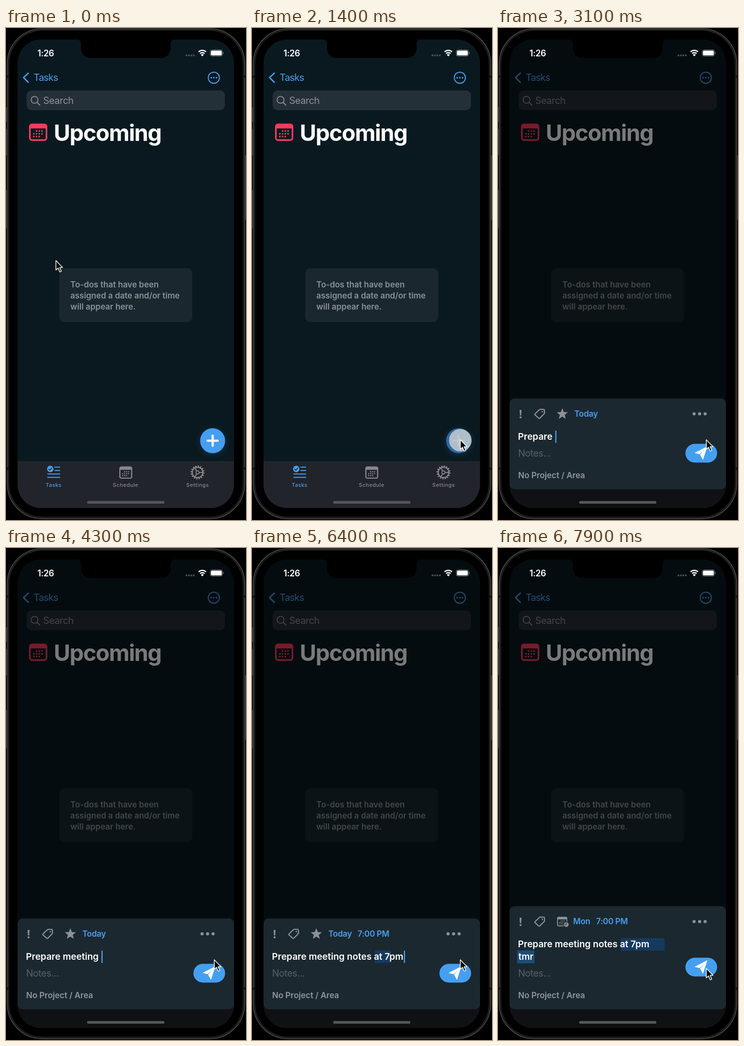
An HTML page that plays this animation: 500 by 1024 pixels, repeating every 8000 ms.

```html
<!DOCTYPE html>
<html lang="en">
<head>
<meta charset="utf-8">
<title>Quick task entry</title>
<style>
  html, body { margin: 0; width: 100%; height: 100%; overflow: hidden; background: #000; }
  svg { display: block; width: 500px; height: 1024px; font-family: Inter, Roboto, sans-serif; }
  text { white-space: pre; }
  .blue { color: #4a9fed; fill: #4a9fed; }
  .line { fill: none; stroke: currentColor; stroke-linecap: round; stroke-linejoin: round; }
  .grey { color: #85878b; fill: #85878b; }
  .label { font-size: 11px; font-weight: 500; letter-spacing: .5px; text-anchor: middle; }
  .nav { font-size: 20px; letter-spacing: -.8px; }
  .card { font-size: 17px; font-weight: 600; fill: #8b9397; }
  .chip { font-size: 17px; font-weight: 600; letter-spacing: -.3px; }
  .entry { font-size: 19px; font-weight: 600; fill: #fff; }
  .hint { font-size: 19.5px; fill: #566169; letter-spacing: -.4px; }
</style>
</head>
<body>
<svg viewBox="0 0 500 1024">
  <defs>
    <symbol id="calendar" viewBox="0 0 38 36" overflow="visible">
      <rect x="1.7" y="1.7" width="34.6" height="32.6" rx="4.5" class="line" stroke-width="3.4"/>
      <path d="M1 10V5a4 4 0 0 1 4-4h28a4 4 0 0 1 4 4v5z" fill="currentColor"/>
      <path d="M15.7 15.5h11.6M10 21.2h17.3M10 26.9h11.6" class="line" stroke-width="3.6" stroke-dasharray="0 5.7"/>
    </symbol>
    <clipPath id="screen"><rect x="24" y="24" width="451" height="975" rx="49"/></clipPath>
    <filter id="glow" x="-50%" y="-50%" width="200%" height="200%"><feGaussianBlur stdDeviation="6"/></filter>
  </defs>

  <!-- phone body -->
  <path d="M1 165v30M1 210v55M1 337v80M499 265v134" stroke="#2b2b2d" stroke-width="2"/>
  <rect x="2.5" y="1.5" width="495" height="1020" rx="73" fill="#1b1b1c" stroke="#4c4c4e" stroke-width="1.5"/>
  <rect x="6" y="5" width="488" height="1013" rx="70" stroke="#29292b"/>
  <path d="M2 101h4M2 917h4M494 101h4M494 917h4" stroke="#141415" stroke-width="5"/>

  <g clip-path="url(#screen)">
    <rect x="24" y="24" width="451" height="975" fill="#0a1920"/>

    <g class="blue">
      <path d="M46.5 94l-10 9.3 10 9.7" class="line" stroke-width="2.7"/>
      <text x="57.5" y="110" class="nav">Tasks</text>
      <circle cx="433" cy="103.5" r="11.6" class="line" stroke-width="2"/>
      <path d="M427.5 103.5h11.2" class="line" stroke-width="3.4" stroke-dasharray="0 5.5"/>
    </g>

    <rect x="43" y="130" width="413" height="41" rx="10" fill="#252f37"/>
    <g color="#8b9197" fill="#8b9197">
      <path d="M65 155l5.5 5.5" class="line" stroke-width="2"/>
      <circle cx="59.5" cy="149.5" r="7.2" class="line" stroke-width="1.8"/>
      <text x="77.5" y="158" class="nav" style="letter-spacing:-.55px">Search</text>
    </g>

    <use href="#calendar" x="48" y="199" width="38" height="36" color="#fd395b"/>
    <text x="99.5" y="234.5" fill="#fff" font-size="47" font-weight="700" letter-spacing="-1.4">Upcoming</text>

    <rect x="111" y="500" width="277" height="112" rx="11" fill="#1a272e"/>
    <g class="card">
      <text x="134" y="539.5">To-dos that have been</text>
      <text x="134" y="562.5">assigned a date and/or time</text>
      <text x="134" y="585.5">will appear here.</text>
    </g>

    <circle cx="430.5" cy="861" r="27" fill="#1e4c78" opacity=".45" filter="url(#glow)"/>
    <g id="add">
      <circle cx="430.5" cy="859" r="26" fill="#459ef0"/>
      <path d="M420 859h21M430.5 848.5v21" class="line" color="#fff" stroke-width="4.6"/>
    </g>

    <rect x="24" y="902" width="451" height="97" fill="#21242a"/>
    <path d="M24 902.5h451" stroke="#2c3035"/>
    <g class="blue">
      <circle cx="92.3" cy="917.8" r="6.7"/>
      <path d="M89.2 918l2.3 2.5 4-5" class="line" color="#21242a" stroke-width="1.8"/>
      <path d="M102 914h10M102 921h10M87 928.3h25M87 935.3h25" class="line" stroke-width="2.1"/>
      <text x="99.2" y="955" class="label">Tasks</text>
    </g>
    <g class="grey">
      <use href="#calendar" x="236" y="912.5" width="27" height="25.6"/>
      <text x="249.2" y="955" class="label">Schedule</text>
      <circle cx="399" cy="925" r="13.2" class="line" stroke-width="2.6" stroke-dasharray="2.6 2.58" style="stroke-linecap:butt"/>
      <circle cx="399" cy="925" r="11" class="line" stroke-width="2.3"/>
      <circle cx="399" cy="925" r="3.4" class="line" stroke-width="1.8"/>
      <path d="M402.5 925h7.5M397.2 922l-3.7-6.4M397.2 928l-3.7 6.4" class="line" stroke-width="2"/>
      <text x="399.2" y="955" class="label">Settings</text>
    </g>

    <rect id="dim" x="24" y="24" width="451" height="975" opacity=".52"/>
  </g>

  <!-- status bar -->
  <path d="M146 23.5c7 .5 10 3 10 9v8c0 14 8 22 22 22h143c14 0 22-8 22-22v-8c0-6 3-8.5 10-9z"/>
  <g fill="#fff" color="#fff">
    <text x="65.5" y="58.7" font-size="18" font-weight="600" letter-spacing="-.4">1:26</text>
    <path d="M376 57h16" class="line" color="#485057" stroke-width="4" stroke-dasharray="0 5.1"/>
    <path d="M401.2 49.7a11.2 11.2 0 0 1 15.6 0M404.2 53.2a6.9 6.9 0 0 1 9.6 0" class="line" stroke-width="2.5" style="stroke-linecap:butt"/>
    <path d="M409 59l-3.1-3.3a4.5 4.5 0 0 1 6.2 0z"/>
    <rect x="425.5" y="45.5" width="25.5" height="13" rx="4" fill="none" stroke="#8d9296"/>
    <rect x="427" y="47" width="22.5" height="10" rx="2.5"/>
    <path d="M452.3 50c1.6.7 1.6 3.3 0 4z" fill="#8d9296"/>
  </g>

  <g id="sheet">
    <rect id="panel" x="24" width="451" rx="11" fill="#1b2830"/>
    <g id="tools" color="#8d9095" fill="#8d9095">
      <path d="M45 795h4l-.7 11.5h-2.6z"/><circle cx="47" cy="810.3" r="2.1"/>
      <path d="M77.3 803l8.800-8.300q1-1 2.400-1l6.400.1q1.800.1 1.900 1.900l.1 5.200q0 1.400-1 2.400l-8.600 8.600q-1.400 1.300-2.800 0l-7.200-6.500q-1.300-1.200 0-2.400z" class="line" stroke-width="2.3"/>
      <circle cx="92.3" cy="798.5" r="1.5"/>
      <path id="star" d="M134 792.5l2.8 7.3 7.8.4-6.1 4.900 2.1 7.500-6.600-4.300-6.600 4.300 2.100-7.500-6.100-4.900 7.800-.4z" stroke="#8d9095" stroke-linejoin="round"/>
      <g id="dated">
        <use href="#calendar" x="123" y="793" width="21.5" height="20"/>
        <circle cx="142.3" cy="809.3" r="5.7" stroke="#1b2830" stroke-width="1.5"/>
        <path d="M142.3 806v3.5h-2.6" class="line" color="#1b2830" stroke-width="1.2"/>
      </g>
      <path d="M408.5 803h23.2" class="line" stroke-width="6.6" stroke-dasharray="0 11.5"/>
      <text id="day" y="808.8" class="chip blue"></text>
      <text id="hour" y="808.8" class="chip blue">7:00 PM</text>
    </g>
    <rect id="markTime" x="256" height="26" fill="#163a5f"/>
    <rect id="markDay" x="40" y="837.5" width="36" height="27"/>
    <text id="prompt" x="43" y="856.5" class="hint">Assignment due next friday...</text>
    <text id="first" x="41.5" class="entry"></text>
    <text id="second" x="42.5" y="856.5" class="entry"></text>
    <rect id="caret" y="838" width="2.4" height="25.5" fill="#4a9fed"/>
    <text x="42" y="891.5" class="hint">Notes...</text>
    <text x="42" y="937.2" font-size="17" font-weight="600" fill="#92969a">No Project / Area</text>
    <g id="send">
      <rect id="pill" x="390.5" y="865.5" width="66" height="39" rx="19.5"/>
      <path d="M435.5 871.5l-25 12.8 9.5 2.2zM435.5 871.5l-14 16.2 5.3 10.3z" fill="#fff" stroke="#fff" stroke-linejoin="round"/>
    </g>
  </g>

  <rect x="169" y="984.5" width="161" height="5.6" rx="2.8" fill="#56575a"/>
  <circle id="touch" cx="434" cy="858" r="23.5" fill="#c9ced3" opacity=".84"/>
  <path id="cursor" d="M0 0v19.8l4.6-4.2 3.5 8.2 3.3-1.4-3.5-8h6z" stroke="#fff" stroke-width="1.5" stroke-linejoin="round"/>
</svg>
<script>
  const $ = id => document.getElementById(id);
  const LOOP = 8000, STEP = 100;
  const LINE = 'Prepare meeting notes at 7pm';

  // [time, characters on the first line]
  const TYPED = [[2100, 1], [2300, 2], [2400, 3], [2600, 4], [2800, 5], [2900, 6], [3000, 7], [3100, 8],
    [3300, 9], [3500, 10], [3600, 11], [3800, 12], [4000, 13], [4100, 14], [4200, 15], [4300, 16],
    [4500, 17], [4700, 18], [4800, 20], [5000, 21], [5200, 23], [5300, 24], [5500, 25],
    [5800, 26], [6100, 27], [6200, 28]];
  const WRAPPED = [[6500, 1], [6600, 2], [6700, 3]];
  // [time, x, y] of the pointer tip
  const PATH = [[0, 104, 484], [1200, 434, 857], [7400, 434, 857], [7800, 434, 875], [8000, 434, 875]];

  const count = (table, t) => table.reduce((n, [at, v]) => t >= at ? v : n, 0);
  const ramp = (t, a, b) => Math.min(1, Math.max(0, (t - a) / (b - a)));
  const show = (id, on) => $(id).style.display = on ? '' : 'none';
  const set = (id, attrs) => { for (const k in attrs) $(id).setAttribute(k, attrs[k]); };

  function pointer(t) {
    const i = Math.max(1, PATH.findIndex(p => p[0] > t));
    const [a, x, y] = PATH[i - 1], [b, u, v] = PATH[i];
    const p = ramp(t, a, b), e = p * p * (3 - 2 * p);
    return `translate(${x + (u - x) * e} ${y + (v - y) * e})`;
  }

  function render(t) {
    const open = t >= 1500, tall = t >= 6500, monday = t >= 7000;
    const pressed = t >= 1300 && !open;
    const n = count(TYPED, t), m = count(WRAPPED, t);

    set('cursor', { transform: pointer(t) });
    show('touch', pressed);
    set('add', { opacity: pressed ? .55 : 1 });
    show('dim', open);
    show('sheet', open);
    if (!open) return;

    const top = tall ? 745.5 : 771;
    set('panel', { y: top, height: 960 - top });
    set('tools', { transform: `translate(0 ${tall ? -25.5 : 0})` });
    set('send', { transform: `translate(0 ${tall ? -12.7 : 0})` });
    set('pill', { fill: n ? '#459ff1' : '#818587' });

    show('star', !monday);
    show('dated', monday);
    $('day').textContent = monday ? 'Mon' : 'Today';
    set('day', { x: monday ? 156.5 : 159 });
    show('hour', t >= 6100);
    set('hour', { x: monday ? 204.5 : 220 });

    show('markTime', t >= 6100);
    set('markTime', { width: monday ? 91 : 34, y: tall ? 812 : 837.5 });
    show('markDay', t >= 6900);
    set('markDay', { fill: monday ? '#1d4c77' : '#163a5f' });

    show('prompt', !n);
    $('first').textContent = LINE.slice(0, n);
    set('first', { y: tall ? 831 : 856.5 });
    $('second').textContent = 'tmr'.slice(0, m);
    const end = $(m ? 'second' : 'first');
    set('caret', {
      x: 42.6 + end.getComputedTextLength() - (m ? 1 : 0),
      opacity: 1 - ramp(t, 7400, 7700)
    });
  }

  function tick() {
    render(Math.floor(performance.now() % LOOP / STEP) * STEP);
    requestAnimationFrame(tick);
  }
  tick();
</script>
</body>
</html>
```
